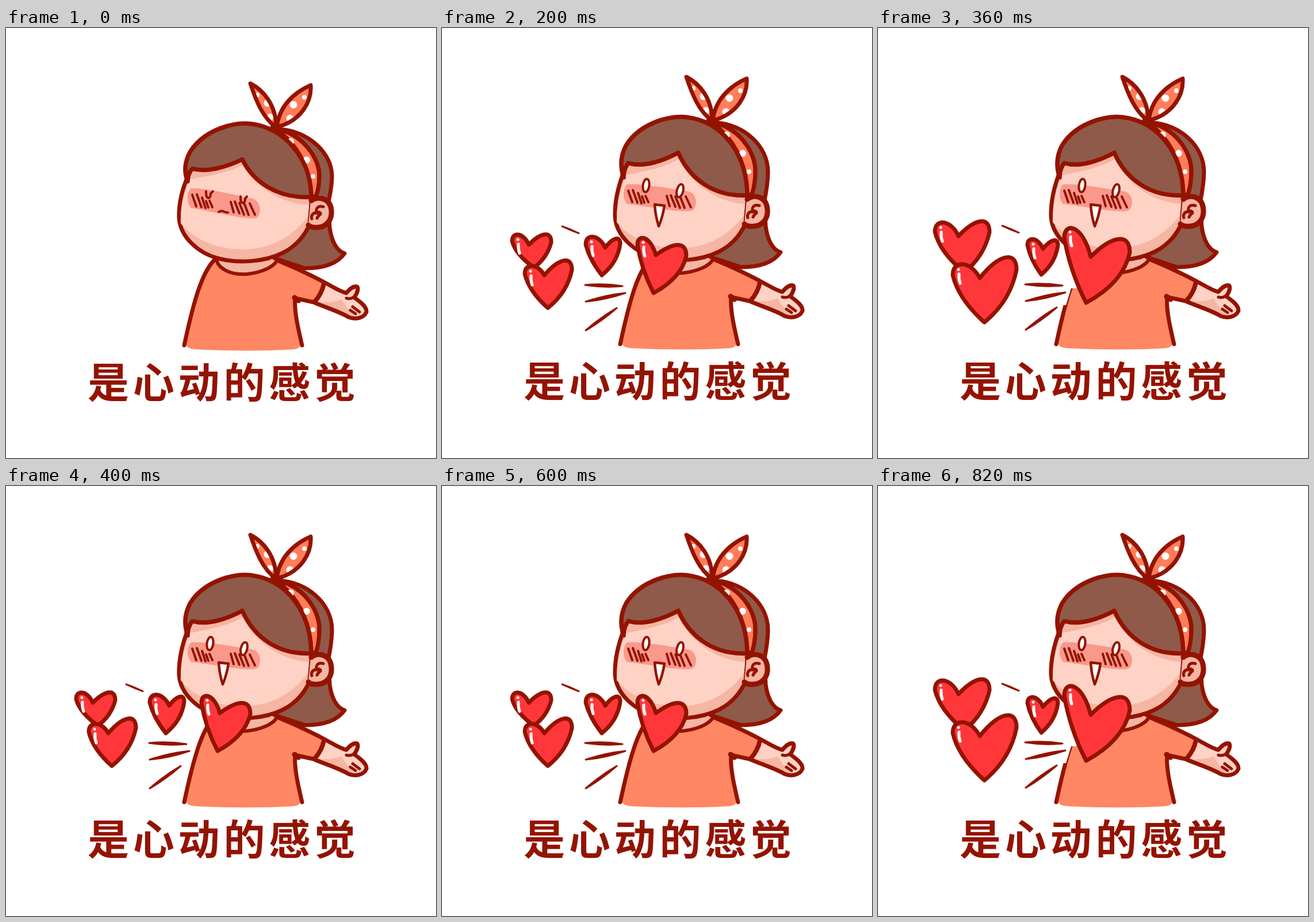
Animation, 748 px wide and 748 px high, one loop 0.9 s. Source, as an HTML page:

```html
<!DOCTYPE html>
<html lang="zh">
<head>
<meta charset="utf-8">
<style>
  html, body { margin: 0; width: 100%; height: 100%; overflow: hidden; background: #fff; }
  svg { display: block; width: 100vw; height: 100vh; }
  path, ellipse { stroke-linecap: round; stroke-linejoin: round; }
  text { font: 700 72px "Noto Sans CJK SC", "Noto Sans CJK", sans-serif; letter-spacing: 6.8px; }
</style>
</head>
<body>
<svg id="stage" viewBox="0 0 748 748"></svg>
<script>
const INK = '#941300', HAIR = '#8f5a49', SKIN = '#ffd2c6', SHADE = '#f5b6a4',
      SHIRT = '#ff8763', BAND = '#ff7d5a', RED = '#ff373b';

const path = (d, fill = 'none', width = 7, stroke = INK) =>
  `<path d="${d}" fill="${fill}" stroke="${width ? stroke : 'none'}" stroke-width="${width}"/>`;
const dots = (points, size) =>
  path(points.map(([x, y]) => `M${x},${y}L${x},${y}`).join(''), 'none', size, '#fff');
const hatch = points => path(points.map(([x, y, dx, dy]) => `M${x},${y}L${x + dx},${y + dy}`).join(''), 'none', 4);

// In the calm pose the top of the head sinks while the body hardly moves.
const sink = y => 2 + 9.5 * Math.min(1, Math.max(0, (300 - y) / 80));
const squash = svg => svg.replace(/([\d.]+),([\d.]+)/g, (_, x, y) => `${x},${+y + sink(+y)}`);

const ponytail = path('M478,165C525,168 567,205 567,250C567,270 564,285 561,300L563,345C566,368 575,386 589,390C575,410 550,416 520,416L466,398L500,200Z', HAIR);

const body =
  path('M362,402C338,430 326,475 312,545Q312,556 330,557C390,560 450,560 500,557Q511,556 513,548L503,468L535,475L554,440L474,402Z', SHIRT, 0) +
  path('M553,441C570,449 580,456 592,459C598,452 604,446 610,448C614,453 610,460 606,467C616,474 628,483 627,492C622,504 606,505 596,501C580,491 555,484 535,475Q549,462 553,441Z', SKIN, 0) +
  path('M541,474Q565,478 584,470Q592,486 606,499L596,501C580,491 560,484 541,474Z', SHADE, 0) +
  path('M474,403C505,416 535,430 555,441C570,449 580,456 592,459C598,452 604,446 611,448C614,453 610,460 606,467C616,474 628,483 627,492C622,504 606,505 596,501C580,491 555,484 535,475L503,468C501,490 508,520 515,550') +
  path('M502,467L509,472', 'none', 9) +
  path('M553,443Q549,461 537,474', 'none', 8) +
  path('M608,462Q603,471 592,468M599,489L608,495M603,483L615,492', 'none', 5) +
  path('M362,402C340,425 326,475 310,550') +
  path('M366,402C372,420 395,428 420,426C445,423 465,414 471,403', SHADE, 6);

const face =
  path('M322,236C308,268 300,298 301,328C303,362 335,390 370,399C405,408 450,405 482,389C505,377 520,358 528,340L532,290L411,217Z', SHADE) +
  path('M320,256C350,250 388,243 412,228C428,262 468,302 527,306L525,326C510,346 480,376 430,382C380,388 330,370 304,338C303,305 311,280 320,256Z', SKIN, 0);

const hair =
  path('M470,164C515,172 546,215 545,250Q545,272 539,290L531,290C530,240 512,196 470,164Z', BAND) +
  dots([[495, 186], [523, 218]], 12) + dots([[534, 250]], 8) +
  path('M470,164C515,172 546,215 545,250Q545,272 539,290') +
  path('M316,260C308,238 312,214 325,197C350,165 395,152 425,155C485,162 530,215 531,291C470,294 430,260 411,217C385,231 350,243 324,235Q316,245 316,260Z', HAIR, 7.5);

const ear =
  path('M530,298C542,289 564,292 566,315C568,334 555,346 538,345Q530,345 526,341Z', SHADE, 0) +
  path('M531,298C542,289 564,292 566,315C568,334 555,346 538,345Q530,345 526,341', 'none', 9) +
  path('M552,309C541,306 538,314 541,320C534,318 530,325 532,330M541,318Q548,318 547,322Q543,324 541,329', 'none', 5);

const leaves = ['M425,85C447,96 470,122 470,161C446,145 434,112 425,85Z', 'M471,161C475,125 500,101 530,88C532,116 514,150 471,161Z'];
const bow = leaves.map(d => path(d, BAND, 0)).join('') +
  dots([[455, 119], [459, 144], [500, 122], [494, 146]], 13) + dots([[437, 105], [519, 109]], 8) +
  leaves.map(d => path(d)).join('') + path('M464,161L477,163', 'none', 9);

const blush =
  path('M322,272C350,270 405,281 428,284C444,288 445,308 437,317C425,324 345,308 322,306C314,298 314,280 322,272Z', '#f9988b', 0) +
  hatch([[324, 283, 7, 20], [332, 282, 8, 22], [341, 287, 6, 18], [348, 293, 4, 11], [354, 292, 5, 11],
         [391, 292, 5, 18], [398, 291, 8, 20], [406, 293, 8, 20], [415, 295, 7, 18], [424, 293, 9, 19]]);

const calm =
  path('M348,284C347,299 356,299 356,288L360,284M408,293C407,307 416,308 416,297L419,293', 'none', 4) +
  path('M370,320Q374,317 378,319T386,321', 'none', 4);
const eye = (x, y, tilt) =>
  `<ellipse rx="5.5" ry="11.5" transform="translate(${x} ${y}) rotate(${tilt})" fill="#fff" stroke="${INK}" stroke-width="4"/>`;
const excited = eye(355, 274, 8) + eye(414, 283, 14) + path('M370,307L387,309Q384,328 377,345Q371,326 370,307Z', '#fff', 4.5);

// Outer edges and tops of both lobes, with the notch and the tip between them.
function heart([x0, y0, nx, ny, x1, y1, tx, ty]) {
  const a = nx - x0, b = x1 - nx, ly = y0 + .4 * a, ry = y1 + .35 * b;
  return path(`M${nx},${ny}C${nx - .3 * a},${y0 - .1 * a} ${x0},${y0 - .2 * a} ${x0},${ly}` +
      `Q${x0 + .2 * a},${(ly + ty) / 2} ${tx},${ty}Q${x1 - .17 * b},${.6 * ty + .4 * ry} ${x1},${ry}` +
      `C${x1},${y1 - .2 * b} ${nx + .5 * b},${y1 - .05 * b} ${nx},${ny}Z`, RED) +
    dots([[x0 + 10, y0 + 9]], 5) +
    path(`M${x0 + 11},${y0 + 17}Q${x0 + 10},${y0 + 25} ${x0 + 13},${y0 + 33}`, 'none', 5, '#fff');
}

const dash = (x0, y0, x1, y1, w) => {
  const x = (x0 + x1) / 2, y = (y0 + y1) / 2;
  return path(`M${x0},${y0}Q${x},${y - w} ${x1},${y1}Q${x},${y + w} ${x0},${y0}Z`, INK, 3);
};
const dashes = dash(209, 345, 238, 357, 1) + dash(249, 447, 314, 449, 4) +
  dash(250, 476, 319, 461, 4) + dash(250, 526, 304, 487, 4);

const small = [[122, 359, 151, 377, 190, 359, 160, 417], [144, 414, 178, 430, 226, 404, 184, 487],
               [250, 363, 284, 382, 310, 366, 278, 430], [340, 364, 372, 395, 425, 378, 368, 461]];
const big = [[99, 338, 140, 362, 194, 336, 150, 425], [130, 411, 177, 435, 241, 398, 185, 512],
             [260, 367, 287, 384, 313, 369, 284, 429], [324, 346, 370, 398, 438, 367, 362, 478]];

const caption = y => `<text x="142" y="${y}" fill="${INK}">是心动的感觉</text>`;
const girl = (gap = '') => ponytail + body + gap + face + hair + ear + bow;
const gap = path('M308,400L352,400L352,452L336,453L327,482L308,482Z', '#fff', 0);

const poses = [
  squash(girl()) + `<g transform="translate(0 -10) skewY(3)">${blush}</g>` + calm + caption(643),
  girl() + blush + excited + dashes + small.map(heart).join('') + caption(641),
  girl(gap) + blush + excited + `<g transform="translate(7 -1)">${dashes}</g>` + big.map(heart).join('') + caption(641)
];

const stage = document.getElementById('stage');
let shown = -1;
function draw() {
  const t = performance.now() % 900;
  const pose = t < 200 ? 0 : t >= 700 ? 2 : 1 + Math.floor((t - 200) / 100) % 2;
  if (pose !== shown) stage.innerHTML = poses[shown = pose];
  requestAnimationFrame(draw);
}
draw();
</script>
</body>
</html>
```
